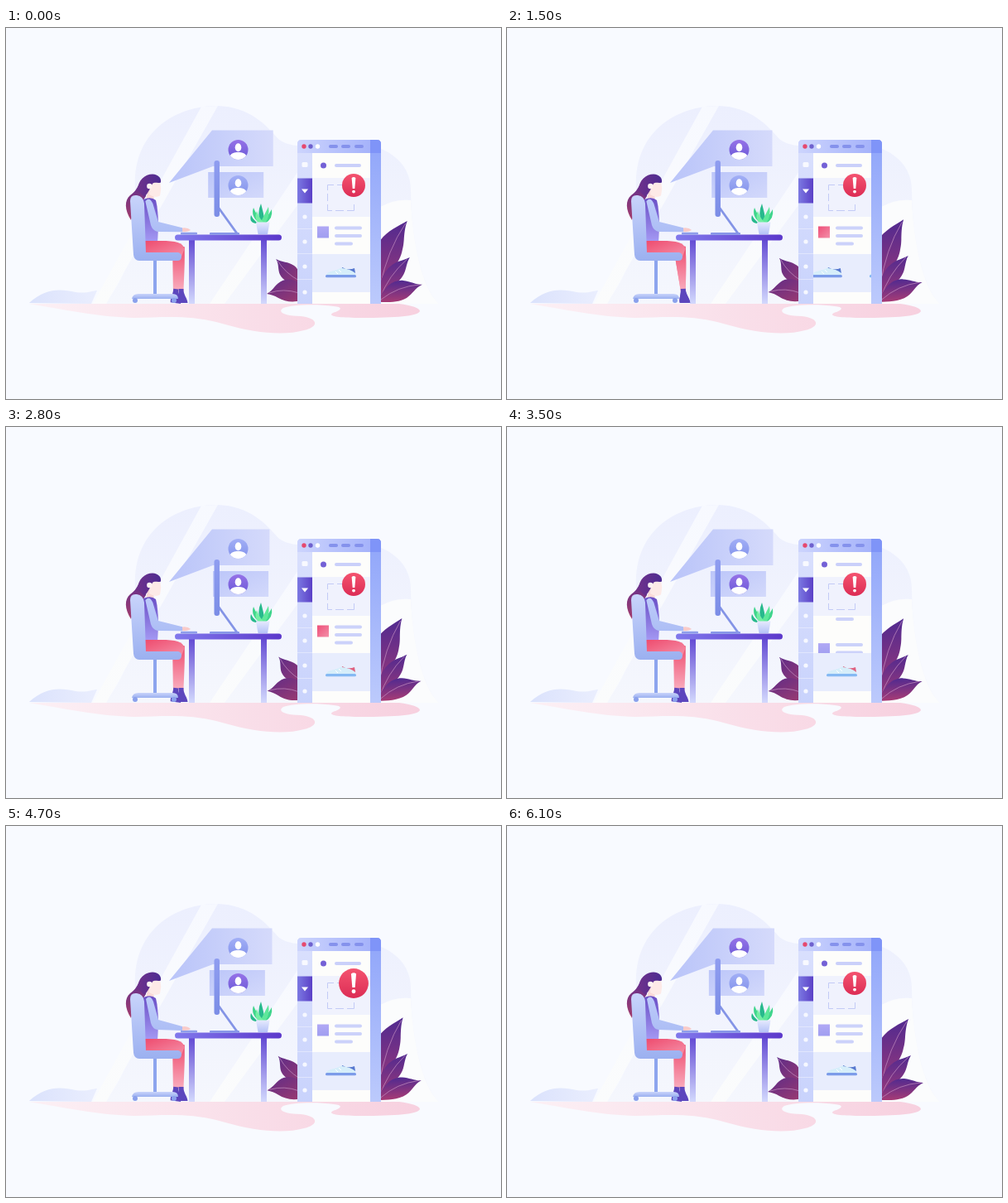
Write an HTML page that moves like this. It is 598x448 px and loops after 6.2 s.

```html
<!DOCTYPE html>
<html lang="en">
<head>
<meta charset="utf-8">
<style>
  html, body { margin: 0; width: 100%; height: 100%; overflow: hidden; background: #f8faff; }
  svg { display: block; width: 100%; height: 100%; }
</style>
</head>
<body>
<svg id="stage" viewBox="0 0 598 448"></svg>
<script>
const LOOP = 6200, STEP = 100;

// id: [x2, y2, first colour, last colour]
const gradients = {
  blob: [0, 1, '#eceffe', '#f5f7fd'], stripe: [0, 1, '#f7f9ff', '#fbfcfc'],
  hill: [1, 0, '#dbe2fc', '#eaeefe'], ground: [1, 0, '#fcf0f5', '#f7d0df'],
  bubble: [1, 0, '#b9c4f9', '#d5dafb'], bubble2: [1, 1, '#bcc6f9', '#d3d9fb'],
  purple: [0, 1, '#9672e8', '#6a5ad6'], blue: [0, 1, '#a2aff6', '#8292ea'],
  top: [1, 0, '#8179ec', '#5c39cb'], leg: [0, 1, '#6249d3', '#d3d9fd'],
  screen: [0, 1, '#8f9df0', '#7b8de6'], vest: [0, 1, '#6a4fc6', '#a59af4'],
  pants: [1, 1, '#ee4a6d', '#f590a8'], shin: [0, 1, '#ee4c6e', '#f9aebf'],
  hair: [0, 1, '#5a2d92', '#a43d6c'], cap: [1, 0, '#6e318b', '#4c2c92'],
  chair: [0, 1, '#c9d4fb', '#9bb0f0'], sleeve: [0, 1, '#bccafa', '#adbef5'],
  head: [1, 0, '#ccd4fd', '#a0aefa'], side: [0, 1, '#dae0fd', '#c9d3fc'],
  edge: [0, 1, '#93a8fa', '#bccafc'], active: [1, 0, '#7c79e2', '#5a3fc6'],
  lilac: [0, 1, '#b1a9f5', '#a09ef0'], pink: [1, 1, '#ee4f78', '#f38fa9'],
  alert: [0, 1, '#f4536f', '#dc2d55'], leafR: [0, 1, '#512a90', '#a63b75'],
  leafL: [1, 1, '#5e2c88', '#9b3a70'], pot: [0, 1, '#e6eafe', '#b5c2f7']
};

const defs = Object.entries(gradients).map(([id, [x, y, a, b]]) =>
  `<linearGradient id="${id}" x2="${x}" y2="${y}"><stop stop-color="${a}"/>
   <stop offset="1" stop-color="${b}"/></linearGradient>`).join('');

const paint = c => gradients[c] ? `url(#${c})` : c;
const rect = (x, y, w, h, c, r = 0) =>
  `<rect x="${x}" y="${y}" width="${w}" height="${h}" rx="${r}" fill="${paint(c)}"/>`;
const disc = (x, y, r, c) => `<circle cx="${x}" cy="${y}" r="${r}" fill="${paint(c)}"/>`;
const shape = (d, c) => `<path d="${d}" fill="${paint(c)}"/>`;
const line = (d, c, w) => `<path d="${d}" fill="none" stroke="${c}" stroke-width="${w}"/>`;
const group = (id, body) => `<g id="${id}">${body}</g>`;
const clip = (id, x, y, w, h) => `<clipPath id="${id}">${rect(x, y, w, h, '#000')}</clipPath>`;

const avatar = c => disc(0, 0, 12, c) +
  '<ellipse cy="-2.8" rx="3.8" ry="5" fill="#fff"/>' +
  shape('M-9.8 7C-7 1.5 7 1.5 9.8 7A12 12 0 0 1-9.8 7Z', '#fff');
const slot = (id, own, other) => `<g clip-path="url(#${id}Clip)">` +
  group(id + 'A', avatar(own)) + group(id + 'B', avatar(other)) + '</g>';

const post = (c, y) => `<g transform="translate(0 ${y})">` + rect(376, 239.5, 14, 14, c) +
  rect(397, 239.5, 33, 4, '#ccd2fa', 2) + rect(397, 249, 33, 4, '#ccd2fa', 2) +
  rect(397, 258.5, 22, 4, '#ccd2fa', 2) + '</g>';

const shoe = (accent, sole, x) => `<g transform="translate(${x} 0)">` +
  shape('M387 298C388 293 399 294 406 289Q414 293 421 290L422 298Z', '#d6eefa') +
  shape('M406 289Q414 293 421 290L422 296Q416 291 406 290Z', accent) +
  line('M398 294l3 3M402 292l3 3', '#fff', 1) + rect(386, 298, 37, 3.2, sole, 1.5) + '</g>';

const scenery =
  shape('M118 333C150 300 158 250 156 195C152 125 205 94 255 94C295 95 315 118 329 134C345 147 375 142 400 138C455 135 489 160 489 195C489 245 500 310 523 333Z', 'blob') +
  shape('M236 95L256 94L121 333H105Z', 'stripe') +
  shape('M355 170V210L264 333H246Z', 'stripe') +
  shape('M452 216Q470 206 489 208C491 250 500 312 523 333H452Z', '#fbfcfd') +
  shape('M28 332C50 312 68 316 84 319C98 321 105 317 110 317L103 333Z', 'hill') +
  shape('M28 333H475C490 335 500 338 500 342C498 348 470 350 430 350C400 350 388 348 395 344C405 341 408 337 396 336C375 333 345 334 335 338C326 344 340 348 356 348C376 350 380 360 360 365C335 372 300 368 265 358C225 346 195 349 155 350C115 349 80 342 28 333Z', 'ground');

const bubbles = group('bubbleTop', '<path fill="url(#bubble)"/>') +
  group('bubbleLow', rect(244, 174, 67, 31, 'bubble2')) +
  slot('slotTop', 'purple', 'blue') + slot('slotLow', 'blue', 'purple');

const blade = (x, y, c) => {
  const bend = (x - 310) * 0.9;
  return shape(`M307 236Q${305 + bend} ${y + 11} ${x} ${y}Q${313 + bend} ${y + 11} 313 236Z`, c);
};
const plant = blade(299, 217, '#3fd58c') + blade(321, 219, '#3fd58c') +
  blade(308, 212, '#27b98c') + blade(317, 216, '#5ee89a') +
  blade(296, 226, '#27b98c') + blade(303, 221, '#74efa4') +
  shape('M302 234.5H318.5L316 249H304.5Z', 'pot');

const desk = rect(221, 255, 7, 78, 'leg') + rect(308, 255, 7, 78, 'leg') +
  rect(204, 249.5, 129, 7, 'top', 3.5) +
  line('M256 216L279 248', '#8494e6', 2.8) + rect(246, 247, 36, 2.8, '#8796e8', 1) +
  rect(251.5, 160, 6.5, 68, 'screen', 3) + plant;

const lowerLeg = id => group(id, shape('M201 264H215.5C216.5 280 215 302 214.5 318H208.5Z', 'shin') +
  group(id + 'Foot', shape('M208.5 315H214.5C214 322 219 326 219.5 332H207C206 326 209 322 208.5 315Z', '#5c46bd')));

const woman =
  shape('M170 181C158 187 160 196 150 202C143 208 143 219 151 232C154 220 163 213 169 203Z', 'hair') +
  shape('M171 196H178L179 210H169Z', '#fad9d7') +
  group('head',
    shape('M174 187L186 185L187.3 194L186 202.5Q180 206 173 201Z', '#fdeae7') +
    shape('M159 196C159 184 168 176.5 177 176.5C184 177 188 181 187 186.5C183 188 180 185.5 177 188C174 193 173 198 167 204Z', 'cap') +
    disc(173.3, 191, 3.2, '#fdf3f2')) +
  shape('M166 207Q175 203 181 208C185 224 184 244 183 259H166Z', 'vest') +
  lowerLeg('legBack') + lowerLeg('legFront') +
  shape('M166 257H187C205 257 214 259 215.5 267L212 276H166Z', 'pants') +
  rect(178, 280, 4, 43, '#8da5ee') +
  shape('M150 209Q150 201 158 202Q166 203 167 212L169 271H208Q212 272 212 276Q212 281 207 281H161Q155 281 154 274Z', 'chair') +
  shape('M152 327Q153 321 160 321H201Q208 321 208 327Z', 'chair') +
  disc(156, 329, 3, '#8ba1ec') + disc(203, 329, 3, '#8ba1ec') +
  rect(211, 246.8, 20, 2.7, '#8e9dea', 1) +
  group('arm',
    shape('M211 242.5Q219 241 223 245Q219 248 211 246.5Z', '#f9cbc9') +
    shape('M169 209Q174 203 178 212L184 234L213 242V247L183 246Q177 245 175 238Z', 'sleeve'));

const leaf = (d, vein, c) => shape(d, c) + line(vein, '#c38fc0', 0.7);
const leaves =
  group('leavesRight',
    leaf('M449 331V262C457 246 473 240 485 233C480 247 482 258 479 268C476 285 463 292 449 331Z', 'M452 312Q461 268 483 236', 'leafR') +
    leaf('M449 331C450 298 462 287 474 282C480 280 484 279 488 277C483 285 484 293 479 300C472 311 460 313 449 331Z', 'M452 326Q462 299 485 279', 'leafR') +
    leaf('M449 331C456 312 468 304 480 305C489 306 495 310 503 310C494 314 492 321 484 326C474 332 460 331 449 331Z', 'M453 328Q473 312 500 310', 'leafR')) +
  group('leavesLeft',
    leaf('M356 316C344 307 335 306 331 298C328 292 330 285 326 279C333 283 341 282 348 287C354 291 356 300 356 316Z', 'M354 305Q337 296 328 281', 'leafL') +
    leaf('M356 329C346 332 336 330 329 326C324 323 320 322 315 321C323 317 326 308 334 305C342 302 350 304 356 309Z', 'M354 320Q335 314 318 320', 'leafL'));

const panel =
  shape('M352 333V140Q352 135 357 135H448Q453 135 453 140V333Z', 'side') +
  rect(370, 151, 70, 182, '#fdfdfb') + rect(440, 151, 13, 182, 'edge') +
  shape('M352 151V140Q352 135 357 135H448Q453 135 453 140V151Z', 'head') +
  shape('M440 135H448Q453 135 453 140V151H440Z', '#7f94f8') +
  disc(360, 143, 2.7, '#e5496f') + disc(368, 143, 2.7, '#6f62cf') + disc(376.5, 143, 2.7, '#fff') +
  [390, 405, 421].map(x => rect(x, 141, 11, 4, '#8592ec', 2)).join('') +
  rect(357.5, 162, 7, 6, '#f8f9ff', 1.5) +
  rect(352, 181.5, 18.5, 30, 'active') + shape('M357 194.5H365L361 199.5Z', '#fff') +
  [242, 272, 303].map(y => rect(352, y, 18, 0.8, '#e6eafe')).join('') +
  [228, 258, 288, 319].map(y => disc(361, y, 2.6, '#f6f8ff')).join('') +
  disc(383.5, 166, 3.5, '#7461d6') + rect(397, 164, 32, 4, '#cad0fa', 2) +
  rect(370, 181, 70, 47, '#f0f2fd') + rect(370, 273, 70, 46, '#e8edfd') +
  line('M388.5 196V189.5H396M400 189.5H410M414 189.5H420.5M420.5 213V220.5H412M408 220.5H398M394 220.5H388.5V213M388.5 209V200', '#c3cbf6', 1) +
  `<g clip-path="url(#postClip)">${group('posts', post('lilac', 0) + post('pink', 50) + post('lilac', 100))}</g>` +
  `<g clip-path="url(#shoeClip)">${group('shoes', shoe('#5878cf', '#7c9ce9', 0) + shoe('#e0607f', '#86b9f3', 70) + shoe('#5878cf', '#7c9ce9', 140))}</g>` +
  group('badge', disc(0, 0, 14, 'alert') +
    shape('M-2.4-9Q0-11 2.4-9L1.3 4H-1.3Z', '#fff') + disc(0, 7.6, 1.9, '#fff'));

const $ = id => document.getElementById(id);
$('stage').innerHTML = `<defs>${defs}</defs>` +
  clip('slotTopClip', 259, 123, 52, 44) + clip('slotLowClip', 259, 174, 52, 31) +
  clip('postClip', 370, 228, 70, 45) + clip('shoeClip', 370, 273, 70, 46) +
  scenery + bubbles + desk + woman + leaves + panel;
const bubblePath = document.querySelector('#bubbleTop path');

const move = (id, x, y) => $(id).setAttribute('transform', `translate(${x} ${y})`);
const turn = (id, angle, x, y) => $(id).setAttribute('transform', `rotate(${angle} ${x} ${y})`);
const wave = (t, period, shift) => Math.cos(2 * Math.PI * (t / period - shift));

function draw(t) {
  const ramp = (a, b) => {
    const p = Math.min(1, Math.max(0, (t - a) / (b - a)));
    return p * p * (3 - 2 * p);
  };

  const sway = wave(t, 1200, 0.06);
  bubblePath.setAttribute('d', `M197 187L249 123.5H${319 + 4 * sway}V167H250Z`);
  move('bubbleLow', 5.3 - 5.5 * sway, 0);

  const swap = (id, y, down, up) => {
    const d = 45 * (ramp(down, down + 700) - ramp(up, up + 800));
    move(id + 'A', 280.5, y + d);
    move(id + 'B', 280.5, y + d - 45);
  };
  swap('slotTop', 147, 2000, 5150);
  swap('slotLow', 190, 2100, 5300);

  const breeze = (1 - wave(t, 2000, 0.06)) / 2;
  turn('leavesRight', -5 * breeze, 452, 331);
  turn('leavesLeft', 4.5 * breeze, 353, 331);

  turn('head', 12 * (ramp(200, 700) - ramp(1500, 2000) + ramp(2200, 2700) - ramp(2900, 3400)), 167, 206);

  const stepForward = ramp(200, 800) - ramp(2200, 2800);
  const tap = ramp(1500, 2000) - ramp(2200, 2800);
  turn('legBack', 7 * (1 - stepForward) - 1.5 * stepForward - tap, 208, 264);
  turn('legFront', -1.5 * stepForward - tap, 208, 264);
  for (const id of ['legBackFoot', 'legFrontFoot']) turn(id, 20 * tap, 211, 316);
  turn('arm', -4 * Math.max(0, wave(t, 500, 0.8)), 180, 240);

  move('posts', 0, -50 * (ramp(200, 800) + ramp(3200, 3750)));
  move('shoes', -70 * (ramp(1300, 1900) + ramp(3800, 4400)), 0);

  const pulse = t > 4400 && t < 5000 ? Math.sin(Math.PI * (t - 4400) / 600) : 0;
  $('badge').setAttribute('transform', `translate(420 190) scale(${1 + 0.28 * pulse})`);
}

function tick() {
  draw(Math.floor(performance.now() % LOOP / STEP) * STEP);
  requestAnimationFrame(tick);
}
tick();
</script>
</body>
</html>
```
